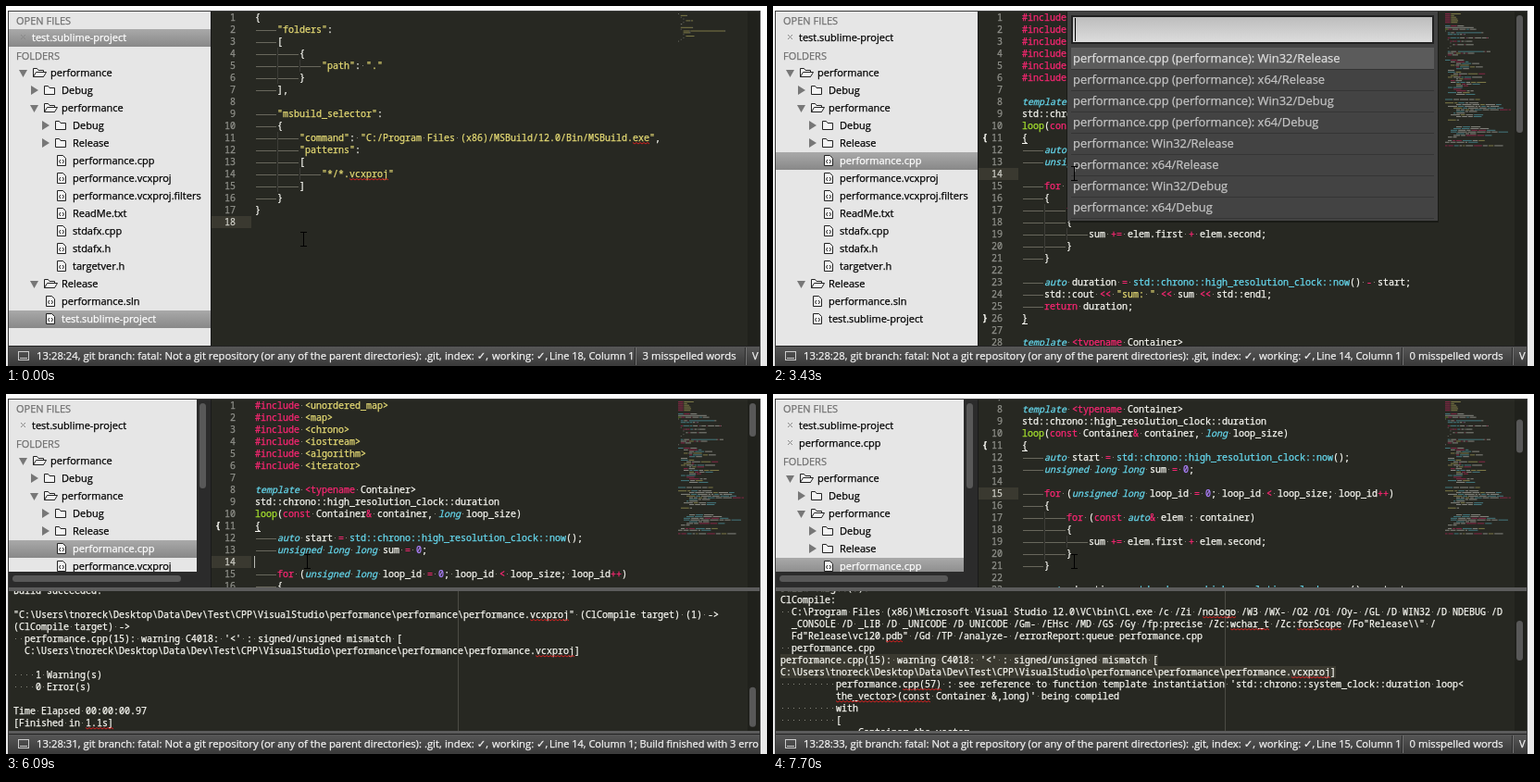
Recreate the animation shown at these times as an HTML page with a canvas. Size 822 px wide and 389 px high, loop 8000 ms.

```html
<!DOCTYPE html>
<html lang="en">
<head>
<meta charset="utf-8">
<title>Building from the editor</title>
<style>
html, body { margin: 0; width: 100%; height: 100%; overflow: hidden; background: #f2f2f2; }
canvas { display: block; }
</style>
</head>
<body>
<canvas id="stage" width="822" height="389"></canvas>
<script>
const ctx = document.getElementById('stage').getContext('2d');
const MONO = '10px "Noto Sans Mono", monospace';
const UI = '11px "Open Sans", "DejaVu Sans", sans-serif';
const BG = '#272822', WHITE = '#f8f8f2', PINK = '#f92672', CYAN = '#66d9ef',
  GREEN = '#a6e22e', YELLOW = '#e6db74', PURPLE = '#ae81ff', FAINT = '#68675c';
const ROW = 13, CHAR = 6, LOOP = 8000, STEP = 70;

const projectCode = `{
\t"folders":
\t[
\t\t{
\t\t\t"path": "."
\t\t}
\t],

\t"msbuild_selector":
\t{
\t\t"command": "C:/Program Files (x86)/MSBuild/12.0/Bin/MSBuild.exe",
\t\t"patterns":
\t\t[
\t\t\t"*/*.vcxproj"
\t\t]
\t}
}
`.split('\n');

const cppCode = `#include <unordered_map>
#include <map>
#include <chrono>
#include <iostream>
#include <algorithm>
#include <iterator>

template <typename Container>
std::chrono::high_resolution_clock::duration
loop(const Container& container, long loop_size)
{
\tauto start = std::chrono::high_resolution_clock::now();
\tunsigned long long sum = 0;

\tfor (unsigned long loop_id = 0; loop_id < loop_size; loop_id++)
\t{
\t\tfor (const auto& elem : container)
\t\t{
\t\t\tsum += elem.first + elem.second;
\t\t}
\t}

\tauto duration = std::chrono::high_resolution_clock::now() - start;
\tstd::cout << "sum: " << sum << std::endl;
\treturn duration;
}

template <typename Container>`.split('\n');

const HOME = String.raw`C:\Users\tnoreck\Desktop\Data\Dev\Test\CPP\VisualStudio\performance\performance\performance.vcxproj`;
const HEADER_ROWS = 10, WARNING_ROW = 15;
// "~" stands for a blank of a wrapped row, which carries no whitespace dot
const output = String.raw`Microsoft (R) Build Engine version 12.0
[Microsoft .NET Framework, version 4.0]
Copyright (C) Microsoft Corporation. All rights reserved.

Build started 13:28:30.

InitializeBuildStatus:
  Creating "unsuccessfulbuild".

Build target(s):
ClCompile:
  C:\Program Files (x86)\Microsoft Visual Studio 12.0\VC\bin\CL.exe /c /Zi /nologo /W3 /WX- /O2 /Oi /Oy- /GL /D WIN32 /D NDEBUG /D
~~_CONSOLE /D _LIB /D _UNICODE /D UNICODE /Gm- /EHsc /MD /GS /Gy /fp:precise /Zc:wchar_t /Zc:forScope /Fo"Release\\" /
~~Fd"Release\vc120.pdb" /Gd /TP /analyze- /errorReport:queue performance.cpp
  performance.cpp
performance.cpp(15): warning C4018: '<' : signed/unsigned mismatch [
${HOME}]
          performance.cpp(57) : see reference to function template instantiation 'std::chrono::system_clock::duration loop<
~~~~~~~~~~the_vector>(const Container &,long)' being compiled
          with
          [
              Container=the_vector
          ]
Done Building Project "${HOME}" (
ClCompile target(s)).

Build succeeded.

"${HOME}" (ClCompile target) (1) ->
(ClCompile target) ->
  performance.cpp(15): warning C4018: '<' : signed/unsigned mismatch [
~~${HOME}]

    1 Warning(s)
    0 Error(s)

Time Elapsed 00:00:00.97
[Finished in 1.1s]`.split('\n');

// level, kind (open folder, closed folder, file), name
const tree = [
  [0, 'open', 'performance'], [1, 'closed', 'Debug'], [1, 'open', 'performance'],
  [2, 'closed', 'Debug'], [2, 'closed', 'Release'], [2, 'file', 'performance.cpp'],
  [2, 'file', 'performance.vcxproj'], [2, 'file', 'performance.vcxproj.filters'],
  [2, 'file', 'ReadMe.txt'], [2, 'file', 'stdafx.cpp'], [2, 'file', 'stdafx.h'],
  [2, 'file', 'targetver.h'], [1, 'open', 'Release'], [1, 'file', 'performance.sln'],
  [1, 'file', 'test.sublime-project']
];
const choices = ['performance.cpp (performance)', 'performance'].flatMap(name =>
  ['Win32/Release', 'x64/Release', 'Win32/Debug', 'x64/Debug'].map(cfg => `${name}: ${cfg}`));
const secondTicks = [280, 1050, 1890, 2870, 3710, 4760, 5740, 6440, 7420];
const mousePath = [[0, 322, 252], [70, 336, 240], [210, 374, 205], [350, 350, 168], [490, 284, 172],
  [630, 280, 172], [1400, 114, 172], [1540, 114, 166], [1820, 114, 166], [2030, 220, 148], [2240, 326, 181]];

let t = 0;
const ease = (from, to) => 1 - (1 - Math.min(1, Math.max(0, (t - from) / (to - from)))) ** 2;
const noise = n => { const v = Math.sin(n * 12.9898) * 43758.5453; return v - Math.floor(v); };
// value of the last [time, value] pair already reached
const held = pairs => pairs.reduce((v, [at, next]) => t >= at ? next : v, 0);

function rect(x, y, w, h, fill) { ctx.fillStyle = fill; ctx.fillRect(x, y, w, h); }
function shade(x, y, w, h, top, bottom) {
  const g = ctx.createLinearGradient(0, y, 0, y + h);
  g.addColorStop(0, top); g.addColorStop(1, bottom);
  rect(x, y, w, h, g);
}
// a hairline outline gives the sturdier strokes of hinted screen type
function text(str, x, y, fill, font = UI) {
  ctx.font = font;
  ctx.fillStyle = ctx.strokeStyle = fill;
  ctx.lineWidth = 0.25;
  ctx.fillText(str, x, y);
  ctx.strokeText(str, x, y);
}
function clipped(x, y, w, h, draw) {
  ctx.save(); ctx.beginPath(); ctx.rect(x, y, w, h); ctx.clip(); draw(); ctx.restore();
}
function path(points, stroke, fill, close = true) {
  ctx.beginPath();
  points.forEach(([x, y]) => ctx.lineTo(x, y));
  if (close) ctx.closePath();
  if (fill) { ctx.fillStyle = fill; ctx.fill(); }
  if (stroke) { ctx.strokeStyle = stroke; ctx.lineWidth = 1; ctx.stroke(); }
}
function thumb(x, y, w, h) {
  ctx.beginPath(); ctx.roundRect(x, y, w, h, 3.5);
  ctx.fillStyle = '#585858'; ctx.fill();
}

const syntax = /("[^"]*"|<\w+>$)|(#include|\b(?:typename|const|for|return)\b|<<|\+\+|\+=|[=<&+-](?=\s|\w|$))|\b(template|auto|unsigned|long)\b|^(loop)|([\w:]+)(?=\()|\b(\d+)\b|[\w:.]+|[^\s\w]/g;
const colours = [YELLOW, PINK, CYAN, GREEN, CYAN, PURPLE];
function tokens(body, plain) {
  if (plain) return [{ at: 0, str: body, fill: WHITE }];
  return [...body.matchAll(syntax)].map(m => {
    const kind = m.slice(1).findIndex(Boolean);
    return { at: m.index, str: m[0], fill: colours[kind] || WHITE, italic: kind === 2 };
  });
}
function squiggle(x, y, w) {
  const points = [];
  for (let i = 0; i <= w; i += 2) points.push([x + i, y + (i % 4 ? 1 : -0.5)]);
  path(points, '#d02020', null, false);
}
const misspelled = /vcxproj|exe(?=")|1\.1s\]|cpp\(57\)|the_vector>\(const|nologo|wchar_t|forScope|pdb/g;

function codeLine(line, x, top, plain) {
  const body = line.replace(/^\t+/, ''), tabs = line.length - body.length;
  for (let i = 0; i < tabs; i++) {
    rect(x + i * 24 + 1, top + 7, 22, 1, FAINT);
    if (i) rect(x + i * 24, top, 1, ROW, 'rgba(255,255,255,.1)');
  }
  x += tabs * 24;
  for (const k of tokens(body, plain))
    text(k.str.replace(/~/g, '\u00a0'), x + k.at * CHAR, top + 10, k.fill, (k.italic ? 'italic ' : '') + MONO);
  [...body].forEach((c, i) => { if (c === ' ') rect(x + i * CHAR + 2, top + 6, 1, 1, '#85847a'); });
  for (const m of body.matchAll(misspelled)) squiggle(x + m.index * CHAR, top + 12, m[0].length * CHAR);
}

function minimap(lines, total) {
  ctx.globalAlpha = 0.45;
  for (let i = 0; i < total; i++) {
    const y = 8 + i * 1.85;
    if (i < lines.length) {
      const body = lines[i].trimStart(), indent = (lines[i].length - body.length) * 4;
      for (const k of tokens(body)) rect(726 + (indent + k.at) * 0.7, y, k.str.length * 0.7, 1, k.fill);
    } else if (noise(i) > 0.16) {
      let x = 726 + (i % 25 < 3 ? 0 : 3 + 3 * Math.floor(noise(i + 90) * 4));
      const end = x + 6 + noise(i + 40) * (i > 50 ? 56 : 36);
      for (let j = 0; x < end; j++) {
        const w = 2 + noise(i * 7 + j) * 9;
        rect(x, y, Math.min(w, 797 - x), 1, [WHITE, CYAN, WHITE, PINK, YELLOW][Math.floor(noise(i + j * 3) * 5)]);
        x += w + 1;
      }
    }
  }
  ctx.globalAlpha = 1;
}

function icon(kind, x, y) {
  const ink = '#222';
  if (kind === 'file') {
    path([[x + 1.5, y - 5.5], [x + 7.5, y - 5.5], [x + 10.5, y - 2.5], [x + 10.5, y + 5.5], [x + 1.5, y + 5.5]], ink, '#f4f4f4');
    path([[x + 5, y - 1], [x + 3.5, y + 1], [x + 5, y + 3]], ink, null, false);
    path([[x + 7, y - 1], [x + 8.5, y + 1], [x + 7, y + 3]], ink, null, false);
    return;
  }
  path([[x + .5, y + 4.5], [x + .5, y - 4.5], [x + 4.5, y - 4.5], [x + 6, y - 2.5], [x + 11.5, y - 2.5], [x + 11.5, y + 4.5]], ink, '#f4f4f4');
  if (kind === 'open')
    path([[x + .5, y + 4.5], [x + 3.5, y - .5], [x + 14.5, y - .5], [x + 11.5, y + 4.5]], ink, '#f4f4f4');
}
function selection(y) { shade(3, y - 9, 218, 19, '#a9a9a9', '#888'); }

function sidebar(bottom, split) {
  const opened = t >= 1680, jumped = t >= 7140;
  clipped(3, 6, 219, bottom - 6, () => {
    rect(3, 6, 219, bottom, '#e6e6e6');
    text('OPEN FILES', 11, 20, '#707070');
    const files = jumped ? ['test.sublime-project', 'performance.cpp'] : ['test.sublime-project'];
    files.forEach((name, i) => {
      const y = 34 + i * 19, chosen = !opened;
      if (chosen) selection(y);
      path([[16, y - 3], [21, y + 2]], '#888', null, false);
      path([[21, y - 3], [16, y + 2]], '#888', null, false);
      text(name, 28, y + 4, chosen ? '#fff' : '#000');
    });
    const shift = jumped ? 19 : 0;
    text('FOLDERS', 11, 58 + shift, '#707070');
    tree.forEach(([level, kind, name], i) => {
      const y = 72 + shift + i * 19, x = 18 + level * 12, chosen = i === (opened ? 5 : 14);
      if (chosen) selection(y);
      if (kind === 'open') path([[x - 4, y - 3], [x + 5, y - 3], [x + .5, y + 5]], null, '#777');
      if (kind === 'closed') path([[x - 3, y - 5], [x + 5, y], [x - 3, y + 5]], null, '#777');
      icon(kind, x + (kind === 'file' ? 12 : 11), y);
      text(name, x + 30, y + 4, chosen ? '#fff' : '#000');
    });
  });
  if (split) {
    rect(206, 6, 16, bottom + 10, '#2b2b2b');
    rect(3, bottom, 219, 17, '#2b2b2b');
    thumb(209, 10, 7, 92);
    thumb(7, bottom + 4, 182, 7);
  }
}

function editor(bottom, split) {
  const cpp = t >= 1680, lines = cpp ? cppCode : projectCode, bracketed = t >= 2730;
  const scroll = 87 * ease(7128, 7420);
  const current = cpp ? (t >= 7140 ? 15 : bracketed ? 14 : 33) : 18;
  clipped(222, 6, 592, bottom - 6, () => {
    rect(222, 6, 592, bottom, BG);
    lines.forEach((line, i) => {
      const n = i + 1, top = 6 + i * ROW - Math.round(scroll);
      if (n === current) rect(222, top, 43, ROW, '#3a3930');
      ctx.textAlign = 'right';
      text(n, 248, top + 10, n === current ? '#d0d0c8' : '#8f908a', MONO);
      ctx.textAlign = 'left';
      codeLine(line, 269, top);
      if (bracketed && (n === 11 || n === 26)) {
        text(line, 226, top + 10, WHITE, 'bold ' + MONO);
        rect(269, top + 12, 6, 1, WHITE);
      }
    });
    if (bracketed && !(t >= 3150 && t < 4690)) {
      ctx.globalAlpha = held([[0, 1], [5950, .85], [6090, .7], [6160, .35], [6230, 0], [6720, .5], [6860, 1], [7560, .5], [7700, 0]]);
      rect(268, 6 + (current - 1) * ROW - Math.round(scroll), 1, ROW, WHITE);
      ctx.globalAlpha = 1;
    }
    minimap(lines, cpp ? 78 : lines.length);
    rect(801, 6, 13, bottom, '#20211c');
    if (cpp) thumb(803, 10 + scroll * 0.2, 7, split ? 36 : 127);
  });
}

function outputPanel(top) {
  rect(3, top, 811, 4, '#5c5c5c');
  rect(3, top + 4, 811, 360 - top, BG);
  rect(3, 364, 811, 3, '#5c5c5c');
  clipped(3, top + 4, 811, 360 - top, () => {
    rect(488, top + 4, 1, 160, '#4b4b44');
    const count = held([[4900, HEADER_ROWS], [5180, 15], [5600, output.length]]);
    const scroll = Math.round(49 * ease(5110, 5320) + 299 * ease(5530, 5810) - 218 * ease(7128, 7420));
    output.slice(0, count).forEach((line, i) => {
      const y = 216 + i * ROW - scroll;
      if (t >= 7140 && (i === WARNING_ROW || i === WARNING_ROW + 1))
        rect(8, y, line.length * CHAR, ROW, '#3a3930');
      codeLine(line, 8, y, true);
    });
    rect(801, top + 4, 13, 160, '#20211c');
    if (count > HEADER_ROWS) thumb(803, 202 + scroll * 0.33, 7, 43);
  });
}

function palette() {
  const height = 40 + 186 * ease(3080, 3430);
  rect(317, 6, 402, height + 2, 'rgba(0,0,0,.35)');
  clipped(318, 6, 400, height, () => {
    rect(318, 6, 400, 226, '#434343');
    rect(322, 10, 392, 31, '#222');
    shade(324, 12, 388, 27, '#bdbdbd', '#dcdcdc');
    ctx.globalAlpha = held([[0, 1], [3710, .5], [3920, 0], [4410, .5], [4480, 1]]);
    rect(326, 13, 1, 25, '#000');
    ctx.globalAlpha = 1;
    choices.forEach((name, i) => {
      const y = 45 + i * 23;
      if (!i) rect(322, y, 392, 23, '#5b5b5b');
      rect(322, y + 23, 392, 1, '#353535');
      text(name, 324, y + 16, i ? '#c4c4c4' : '#dedede', '12.9px "Open Sans", sans-serif');
    });
  });
}

function separator(x) { rect(x, 369, 1, 19, '#2a2a2a'); rect(x + 1, 369, 1, 19, '#747474'); }
function statusBar() {
  const done = t >= 5810 && t < 7140, building = t >= 4690 && t < 5810, far = t >= 1680 && t < 2730;
  const place = t >= 7140 ? 'Line 15, Column 1' : t >= 2730 ? 'Line 14, Column 1' : far ? 'Line 33, Column 21' : 'Line 18, Column 1';
  const state = done ? '; Build finished with 3 errors' : building ? '; Building' : '';
  const edge = done ? 814 : building ? 729 : far ? 685 : 679;
  const ink = '#f4f4f4', seconds = 24 + secondTicks.filter(at => t >= at).length;
  const wide = UI.replace('11px', '11.3px');
  shade(3, 367, 811, 21, '#585858', '#3a3a3a');
  rect(3, 367, 811, 1, '#222');
  ctx.strokeStyle = '#ccc'; ctx.lineWidth = 1;
  ctx.strokeRect(13.5, 373.5, 11, 9);
  rect(15, 380, 8, 1, '#ccc');
  clipped(3, 367, edge - 4, 21, () => {
    text(`13:28:${seconds}, git branch: fatal: Not a git repository (or any of the parent directories): .git,`, 33, 382, ink, wide);
    text('index: ✓,', 474, 382, ink, wide);
    text('working: ✓,', 525, 382, ink, wide);
    text(place + state, 587, 382, ink);
  });
  if (done) return;
  separator(edge);
  clipped(edge, 367, 814 - edge, 21, () => {
    text(`${t < 1680 ? 3 : 0} misspelled words`, edge + 8.5, 382, ink, wide);
    if (building) return;
    separator(far ? 803 : 798);
    if (!far) text('V', 806, 382, ink);
  });
}

function mouse() {
  let i = mousePath.findIndex(p => p[0] > t);
  if (i < 0) i = mousePath.length - 1;
  const [t0, x0, y0] = mousePath[i - 1], [t1, x1, y1] = mousePath[i];
  const k = Math.min(1, (t - t0) / (t1 - t0));
  const x = Math.round(x0 + (x1 - x0) * k), y = Math.round(y0 + (y1 - y0) * k);
  if (x > 222) {
    rect(x - 1, y - 8, 1, 16, '#000');
    rect(x - 4, y - 8, 7, 1, '#000');
    rect(x - 4, y + 7, 7, 1, '#000');
  } else {
    path([[0, 0], [0, 16], [4, 12.5], [6.5, 18], [8.5, 17], [6, 11.5], [11, 11.5]]
      .map(([px, py]) => [x + px + .5, y + py + .5]), '#000', '#fff');
  }
}

function frame(now) {
  t = Math.floor((now % LOOP) / STEP) * STEP;
  const split = t >= 4690, panelTop = t >= 4760 ? 209 : 290;
  shade(0, 0, 822, 389, '#fdfdfd', '#e8e8e8');
  rect(2, 5, 813, 384, '#3c3c3c');
  editor(split ? panelTop : 367, split);
  sidebar(split ? panelTop - 17 : 367, split);
  rect(221, 6, 1, (split ? panelTop : 367) - 6, '#1a1a1a');
  if (split) outputPanel(panelTop);
  statusBar();
  if (t >= 3150 && t < 4690) palette();
  mouse();
  requestAnimationFrame(frame);
}
requestAnimationFrame(frame);
</script>
</body>
</html>
```
